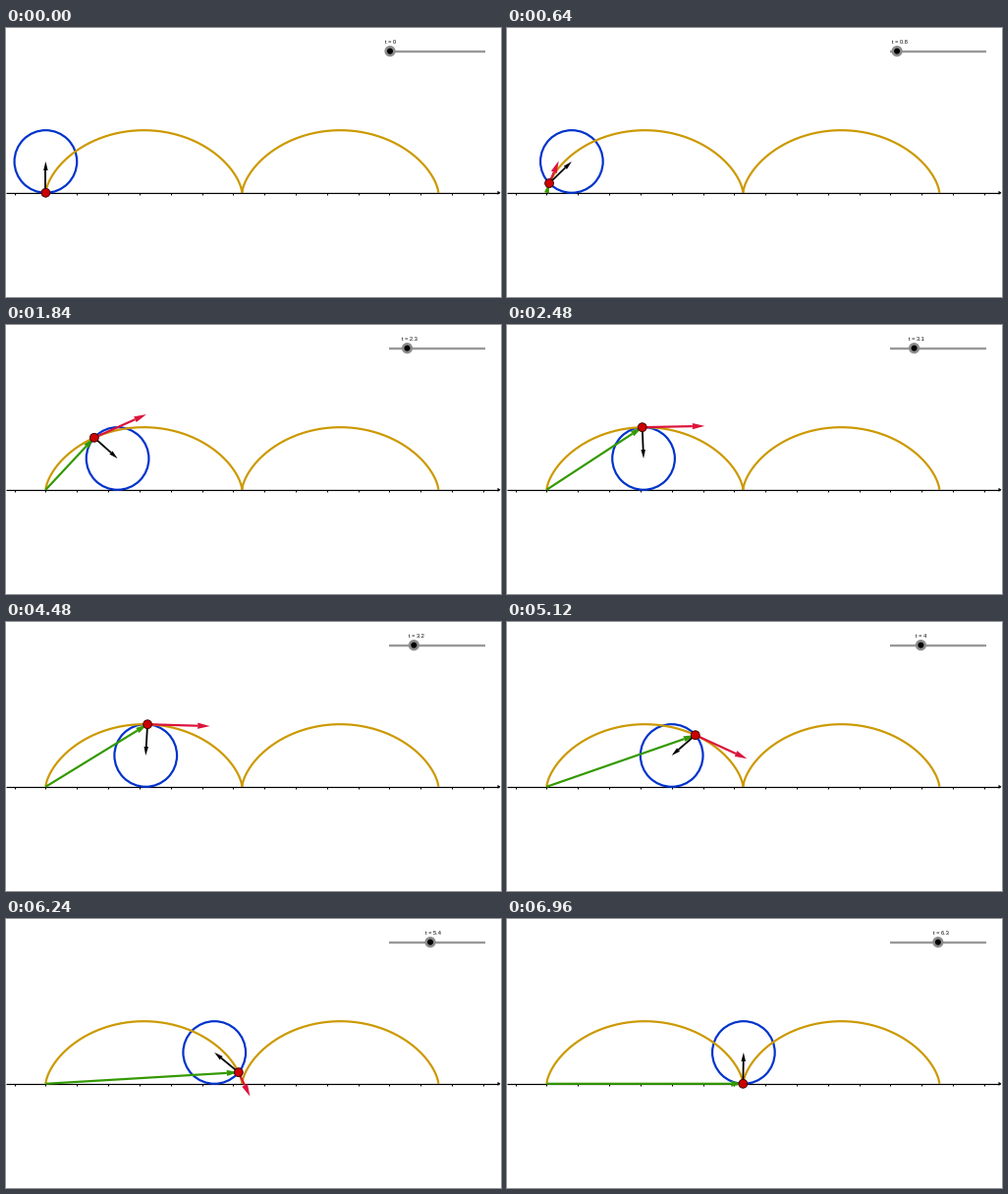
These frames come from a looping animation (504x274 px, 8 s). A matplotlib script:

```python
import numpy as np
import matplotlib.pyplot as plt
from matplotlib.animation import FuncAnimation
from matplotlib.patches import Circle, Polygon

W, H, DPI = 504, 274, 100
PX = 72 / DPI                      # points per pixel
FRAMES, STEP_MS = 100, 80
ORIGIN = np.array([40.4, 167.8])
R = 31.82
BLUE, GOLD, GREEN = "#0033cc", "#cc9900", "#339900"
CRIMSON, DOT = "#dc143c", "#cc0000"
SLIDER_X, SLIDER_Y, SLIDER_SCALE = 391.0, 23.6, 7.6

fig = plt.figure(figsize=(W / DPI, H / DPI), dpi=DPI, facecolor="white")
ax = fig.add_axes([0, 0, 1, 1])
ax.set_xlim(0, W)
ax.set_ylim(H, 0)
ax.axis("off")


def line(xs, ys, color, width, z):
    return ax.plot(xs, ys, color=color, lw=width * PX, zorder=z,
                   solid_capstyle="butt", solid_joinstyle="miter")[0]


def disc(radius, z, face="none", edge="none", width=0):
    return ax.add_patch(Circle((0, 0), radius, fc=face, ec=edge,
                               lw=width * PX, zorder=z))


def to_stage(x, y):
    """Map curve units (y up) to stage pixels."""
    return np.array([ORIGIN[0] + R * x, ORIGIN[1] - R * y])


class Arrow:
    def __init__(self, color, width, head, z):
        self.head = head
        self.shaft = line([], [], color, width, z)
        self.tip = ax.add_patch(Polygon(np.zeros((3, 2)), fc=color,
                                        ec="none", zorder=z))

    def set(self, start, end):
        delta = end - start
        length = np.hypot(*delta)
        visible = length > 1
        self.shaft.set_visible(visible)
        self.tip.set_visible(visible)
        if not visible:
            return
        unit = delta / length
        head = min(self.head, length)
        base = end - head * unit
        side = head / 4 * np.array([-unit[1], unit[0]])
        self.shaft.set_data(*zip(start, base))
        self.tip.set_xy([end, base + side, base - side])


# Axis with ticks
line([0, W - 2], [ORIGIN[1]] * 2, "black", 1.2, 1)
ax.add_patch(Polygon([(W - 0.5, ORIGIN[1]), (W - 3.5, ORIGIN[1] - 2),
                      (W - 3.5, ORIGIN[1] + 2)], fc="black", ec="none"))
for k in range(-1, 15):
    line([ORIGIN[0] + k * R] * 2, [ORIGIN[1], ORIGIN[1] + 2.2], "black", 1, 1)

# Two arches of the cycloid
s = np.linspace(0, 4 * np.pi, 401)
line(*to_stage(s - np.sin(s), 1 - np.cos(s)), GOLD, 2.2, 3)

# Slider
line([SLIDER_X - 1, SLIDER_X + 4 * np.pi * SLIDER_SCALE + 1], [SLIDER_Y] * 2,
     "#999999", 2.4, 1)
knob = disc(5.6, 2, "#8c8c8c")
knob_core = disc(3, 3, "black")
label = ax.text(0, 16.2, "", family="Liberation Sans", size=5.6 * PX,
                color="black", ha="left", va="baseline")

wheel = disc(R, 2, edge=BLUE, width=2.2)
position = Arrow(GREEN, 2.2, 12, 4)
velocity = Arrow(CRIMSON, 2.2, 12.5, 5)
acceleration = Arrow("black", 1.8, 9, 6)
dot = disc(4.4, 7, DOT, "#400000", 0.9)


def update(i):
    # Pause at the top of the arch, then roll on to the cusp
    tenths = min(i, 31) + min(max(i - 55, 0), 32)
    t = tenths / 10
    sin, cos = np.sin(t), np.cos(t)
    point = to_stage(t - sin, 1 - cos)
    center = to_stage(t, 1)

    wheel.center = center
    dot.center = point
    position.set(ORIGIN, point)
    velocity.set(point, point + R * np.array([1 - cos, -sin]))
    acceleration.set(point, center)

    x = SLIDER_X + SLIDER_SCALE * t
    knob.center = knob_core.center = (x, SLIDER_Y)
    label.set_x(x - 5.3)
    label.set_text(f"t = {t:g}")
    return []


anim = FuncAnimation(fig, update, frames=FRAMES, interval=STEP_MS,
                     repeat=True, repeat_delay=0, blit=False)
plt.show()
```
